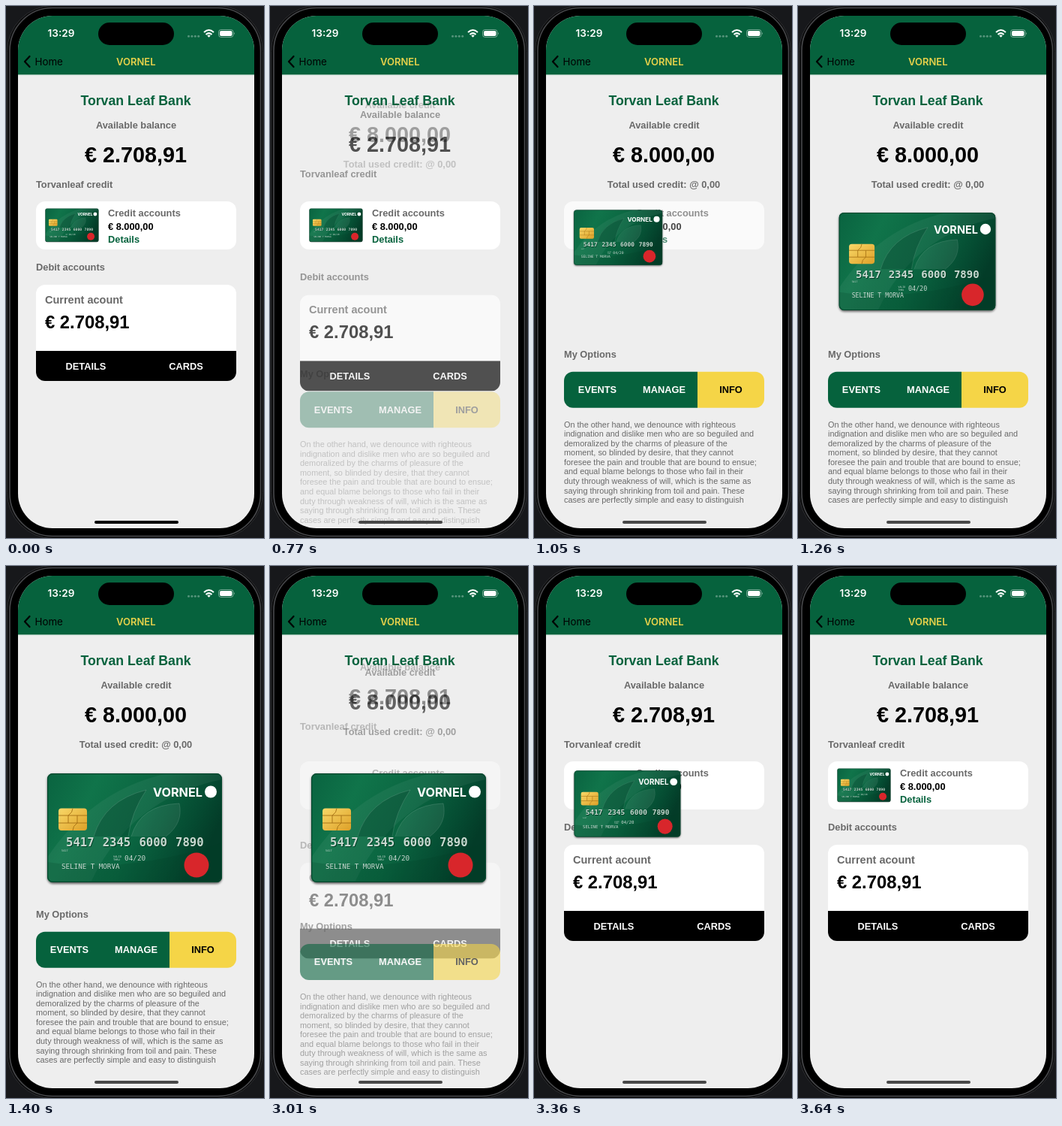
Write an HTML page that moves like this. It is 344 px wide and 708 px high and loops after 3710 ms.

```html
<!DOCTYPE html>
<html lang="en">
<head>
<meta charset="utf-8">
<title>Bank card</title>
<style>
  html, body { margin: 0; width: 100%; height: 100%; overflow: hidden; background: #17181b; }
  svg { display: block; width: 344px; height: 708px; }
  text { font: bold 12.82px "Liberation Sans", Arial, sans-serif; }
  .ui { font-family: Inter, sans-serif; }
  .mid { text-anchor: middle; }
  .grey { fill: #696969; }
  .green { fill: #06623d; }
  .white { fill: #fff; }
  .big { font-size: 28.8px; }
  .body { font-size: 10.9px; font-weight: normal; fill: #696969; }
  .emboss { font-family: "DejaVu Sans Mono", monospace; font-weight: normal; fill: #c9d8d0; }
  .tiny { font-size: 3.6px; }
  .number { font-size: 15.6px; font-weight: bold; }
</style>
</head>
<body>
<svg viewBox="0 0 344 708">
  <defs>
    <clipPath id="screen"><rect x="16" y="13" width="315" height="682" rx="46"/></clipPath>
    <clipPath id="debitBox"><rect x="40" y="371" width="267" height="128" rx="12"/></clipPath>
    <clipPath id="tabBox"><rect x="40" y="486.7" width="267" height="48" rx="12"/></clipPath>
    <clipPath id="cardBox"><rect width="233" height="145" rx="7"/></clipPath>
    <linearGradient id="felt" x1="0" y1="0.1" x2="1" y2="0.4">
      <stop offset="0" stop-color="#0a6541"/>
      <stop offset="0.25" stop-color="#10744a"/>
      <stop offset="0.6" stop-color="#0a6440"/>
      <stop offset="0.85" stop-color="#054c32"/>
      <stop offset="1" stop-color="#033c28"/>
    </linearGradient>
    <linearGradient id="gold" x1="0" y1="0" x2="1" y2="1">
      <stop offset="0" stop-color="#f9d868"/>
      <stop offset="1" stop-color="#dda028"/>
    </linearGradient>
    <filter id="soft" x="-10%" y="-10%" width="120%" height="125%">
      <feGaussianBlur stdDeviation="1.6"/>
    </filter>
  </defs>

  <!-- phone body -->
  <rect width="344" height="708" fill="#17181b"/>
  <rect x="1.5" y="-0.5" width="341" height="709" rx="61" fill="#0b0b0c" stroke="#2d2e31"/>
  <rect x="5" y="2.5" width="334.5" height="703" rx="57" fill="#000" stroke="#47484b" stroke-width="1.6"/>

  <g clip-path="url(#screen)">
    <rect x="16" y="13" width="315" height="682" fill="#eee"/>

    <g id="row">
      <rect x="40" y="260" width="267" height="64" rx="12" fill="#fff"/>
      <text class="grey" x="136" y="279.5">Credit accounts</text>
      <text x="136" y="297.5">€ 8.000,00</text>
      <text class="green" x="136" y="315">Details</text>
    </g>

    <g id="pages">
      <g id="detail">
        <g class="up">
          <text class="mid grey" x="173.5" y="162.5">Available credit</text>
          <text class="mid big" x="173" y="207.5">€ 8.000,00</text>
          <text class="mid grey" x="173" y="241.5">Total used credit: @ 0,00</text>
        </g>
        <g class="down">
          <text class="grey" x="40" y="467.5">My Options</text>
          <g clip-path="url(#tabBox)">
            <rect class="green" x="40" y="486" width="178" height="50"/>
            <rect x="218" y="486" width="89" height="50" fill="#f5d547"/>
          </g>
          <text class="mid white" x="84.5" y="515">EVENTS</text>
          <text class="mid white" x="173.5" y="515">MANAGE</text>
          <text class="mid" x="262.5" y="515">INFO</text>
          <g id="copy"></g>
        </g>
      </g>

      <g id="list">
        <g class="up">
          <text class="mid grey" x="173.5" y="162.5">Available balance</text>
          <text class="mid big" x="173" y="207.5">€ 2.708,91</text>
          <text class="grey" x="40" y="241.5">Torvanleaf credit</text>
        </g>
        <g class="down">
          <text class="grey" x="40" y="352">Debit accounts</text>
          <g clip-path="url(#debitBox)">
            <rect x="40" y="371" width="267" height="128" fill="#fff"/>
            <rect x="40" y="459" width="267" height="40"/>
          </g>
          <text class="grey" x="52" y="396" style="font-size:14.5px">Current acount</text>
          <text x="52" y="429" style="font-size:23.8px">€ 2.708,91</text>
          <text class="mid white" x="106.5" y="483.5">DETAILS</text>
          <text class="mid white" x="240" y="483.5">CARDS</text>
        </g>
      </g>
    </g>

    <text class="mid green" x="173" y="131.5" style="font-size:17.7px">Torvan Leaf Bank</text>

    <g id="card">
      <rect y="1" width="233" height="146" rx="8" opacity="0.6" filter="url(#soft)"/>
      <g clip-path="url(#cardBox)">
        <rect width="233" height="145" fill="url(#felt)"/>
        <path d="M0 112 Q60 22 160 0 H233 V8 Q110 34 58 145 H0Z" fill="#fff" opacity="0.05"/>
        <path d="M62 84 Q76 36 132 22 Q112 52 108 84Z" fill="#02402a" opacity="0.35"/>
        <path d="M112 84 Q124 42 176 40 Q182 66 158 84Z" fill="#fff" opacity="0.07"/>
        <path d="M62 84 Q76 36 132 22 Q112 52 108 84M112 84 Q124 42 176 40 Q182 66 158 84"
              fill="none" stroke="#fff" opacity="0.12"/>
        <path d="M0 145 V118 Q110 134 233 92 V145Z" fill="#013d27" opacity="0.2"/>
      </g>
      <rect x="0.6" y="0.6" width="231.8" height="143.8" rx="7" fill="none" stroke="#04472d" stroke-width="1.2"/>
      <text class="ui white" x="141" y="31" style="font-size:16.2px">VORNEL</text>
      <circle cx="218" cy="24.5" r="8" fill="#fff"/>
      <rect x="15" y="46.5" width="38" height="29.5" rx="4" fill="url(#gold)"/>
      <path d="M15 56H28V66H15M53 56H40V66H53M28 56Q34 52 34 46.5M40 66Q34 70 34 76M28 56H40M28 66H40"
            fill="none" stroke="#a46f12" stroke-width="0.9"/>
      <g id="digits"></g>
      <text class="emboss tiny" x="19" y="104">5417</text>
      <text class="emboss tiny" x="88" y="112">VALID</text>
      <text class="emboss tiny" x="88" y="116">THRU</text>
      <text class="emboss" x="103" y="115.5" style="font-size:9.4px">04/20</text>
      <text class="emboss" x="19" y="126.5" style="font-size:9.2px">SELINE T MORVA</text>
      <circle cx="199" cy="122" r="16.5" fill="#d8262b"/>
    </g>

    <!-- header -->
    <rect x="16" y="91" width="315" height="1.2" fill="#b9d0c4"/>
    <rect class="green" x="16" y="13" width="315" height="78.2"/>
    <text class="ui mid white" x="73.5" y="41" style="font-size:13.6px;font-weight:600">13:29</text>
    <rect x="123" y="22" width="101" height="30" rx="15"/>
    <g fill="#fff" opacity="0.32" id="dots"></g>
    <path d="M264 35Q270.5 29 277 35M266.5 38Q270.5 34.2 274.5 38" fill="none" stroke="#fff" stroke-width="2"/>
    <path d="M268.3 39.5Q270.5 37.5 272.7 39.5L270.5 41.8Z" fill="#fff"/>
    <rect x="283.5" y="31.5" width="19.5" height="10" rx="3.2" fill="none" stroke="#fff" opacity="0.45"/>
    <rect x="285" y="33" width="16.5" height="7" rx="2" fill="#fff"/>
    <path d="M304.2 35Q306 36.5 304.2 38.3Z" fill="#fff" opacity="0.5"/>
    <path d="M31.5 67L25 74L31.5 81" fill="none" stroke="#000" stroke-width="2.2" stroke-linecap="round" stroke-linejoin="round"/>
    <text class="ui" x="38.6" y="78.8" style="font-size:13.3px;font-weight:400">Home</text>
    <text class="ui mid" x="173.3" y="78.5" fill="#e8d24a" style="font-size:13px;font-weight:600">VORNEL</text>

    <rect id="homeBar" x="118" y="685" width="112" height="4" rx="2"/>
  </g>
</svg>
<script>
const LOOP = 3710, TICK = 70, SHIFT = 40, OPEN = 770, BACK = 3010;
const $ = id => document.getElementById(id);

function add(parent, tag, attrs, text = '') {
  const el = document.createElementNS('http://www.w3.org/2000/svg', tag);
  for (const k in attrs) el.setAttribute(k, attrs[k]);
  el.textContent = text;
  parent.append(el);
}

[
  'On the other hand, we denounce with righteous',
  'indignation and dislike men who are so beguiled and',
  'demoralized by the charms of pleasure of the',
  'moment, so blinded by desire, that they cannot',
  'foresee the pain and trouble that are bound to ensue;',
  'and equal blame belongs to those who fail in their',
  'duty through weakness of will, which is the same as',
  'saying through shrinking from toil and pain. These',
  'cases are perfectly simple and easy to distinguish'
].forEach((line, i) => add($('copy'), 'text', { class: 'body', x: 40, y: 560.7 + i * 12.55 }, line));

['5417', '2345', '6000', '7890'].forEach((group, i) => {
  const x = 25 + i * 48.7;
  add($('digits'), 'text', { class: 'emboss number', x: x + 0.9, y: 97.7, style: 'fill:#033e27' }, group);
  add($('digits'), 'text', { class: 'emboss number', x, y: 96.8 }, group);
});

for (let i = 0; i < 4; i++) add($('dots'), 'circle', { cx: 243.5 + i * 4.4, cy: 40.3, r: 1.5 });

const clamp = v => Math.max(0, Math.min(1, v));
const mix = (a, b, p) => a + (b - a) * p;
const ramp = (t, from, first, span) => t < from ? 0 : clamp(first + (t - from) / span);
const easeOut = x => 1 - Math.pow(1 - clamp(x), 1.7);

function showPage(id, p) {
  const page = $(id), d = SHIFT * (1 - p);
  page.setAttribute('opacity', p);
  page.querySelector('.up').setAttribute('transform', `translate(0 ${-d})`);
  page.querySelector('.down').setAttribute('transform', `translate(0 ${d})`);
}

function draw(t) {
  const opening = t < BACK;
  const back = ramp(t, BACK, 0.41, 310);
  const list = opening ? 1 - ramp(t, OPEN, 0.335, 300) : back;
  const row = opening ? 1 - ramp(t, 1050, 0.29, 295) : back;
  const grow = opening ? easeOut((t - 972) / 428) : 1 - easeOut((t - 3195) / 428);

  // the leaving page lies on top
  $('pages').append($(opening ? 'list' : 'detail'));
  showPage('list', list);
  showPage('detail', 1 - list);
  $('row').setAttribute('opacity', row);
  $('card').setAttribute('transform',
    `translate(${mix(52.4, 55, grow)} ${mix(269.5, 276, grow)}) scale(${mix(0.305, 1, grow)})`);
  $('homeBar').setAttribute('fill', t < OPEN ? '#000' : '#484848');
}

const start = performance.now();
function loop() {
  const t = (performance.now() - start) % LOOP;
  draw(Math.floor(t / TICK) * TICK);
  requestAnimationFrame(loop);
}
draw(0);
requestAnimationFrame(loop);
</script>
</body>
</html>
```
